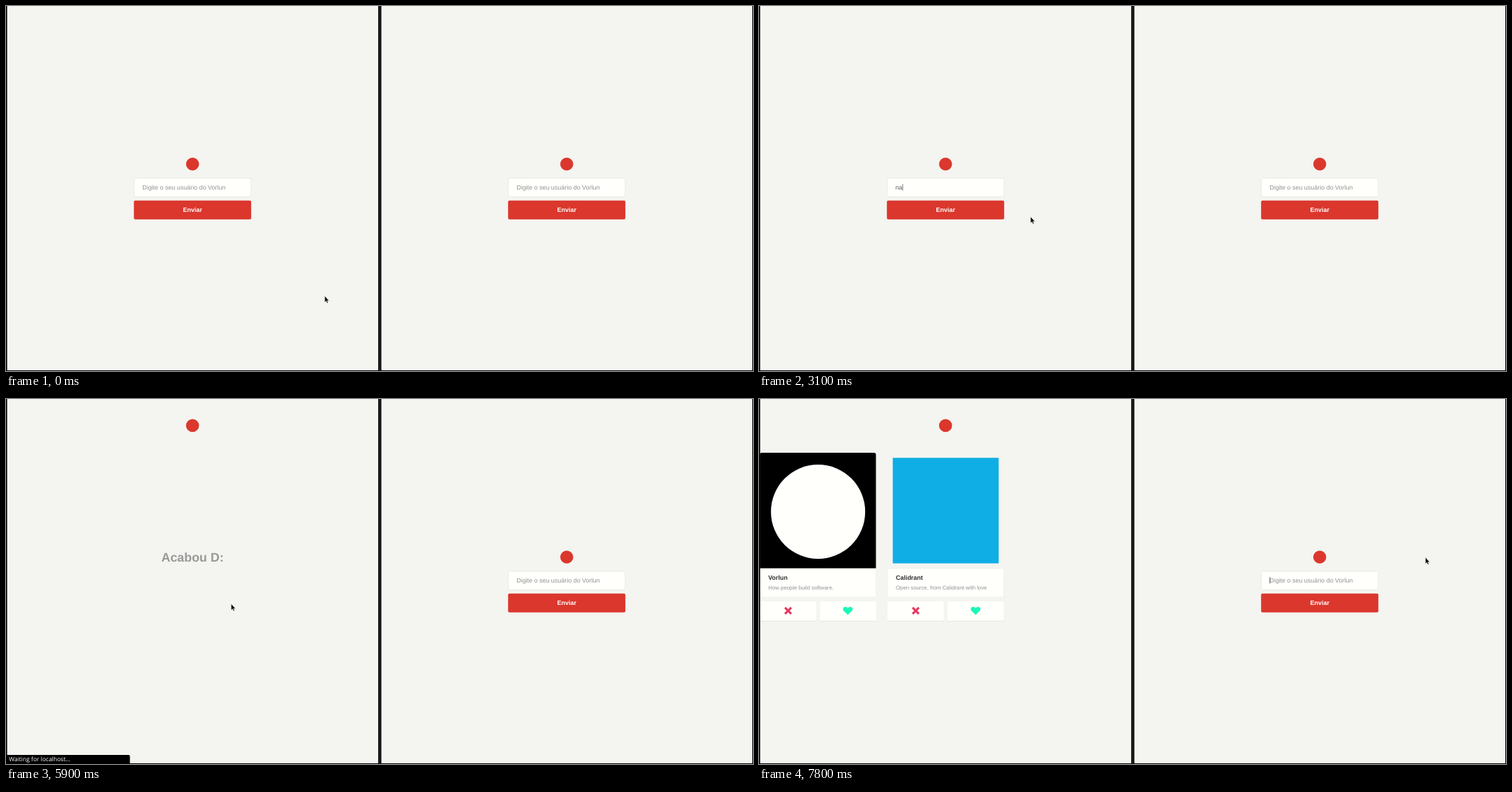
An HTML page for the animation above (8 s loop, 1070x523 px).

```html
<!DOCTYPE html>
<html lang="pt-BR">
<head>
<meta charset="utf-8">
<title>Login</title>
<style>
  html, body { margin: 0; width: 100%; height: 100%; overflow: hidden; background: #000; }
  svg { display: block; width: 1070px; height: 523px; }
  text { font: 8.95px "Liberation Sans", Arial, sans-serif; white-space: pre; text-rendering: geometricPrecision; }
  .bold { font-weight: bold; }
  .hint { fill: #929292; }
  .typed { fill: #606060; }
  .name { font-weight: bold; fill: #2e2e2e; }
  .bio { font-size: 7.81px; fill: #929292; }
  .over { font-size: 17.86px; font-weight: bold; fill: #999; }
  .status { font: 8.5px "Open Sans", "Noto Sans", sans-serif; fill: #fff; }
  .caret { stroke: #444; stroke-width: .7; }
  .box { fill: #fffffc; stroke: #e0e0dd; stroke-width: .6; }
  .red { fill: #db372d; }
  .page { fill: #f4f4f0; }
</style>
</head>
<body>
<svg viewBox="0 0 1070 523">
  <defs>
    <circle id="logo" class="red" r="9.3"/>
    <g id="form">
      <use href="#logo" x="267.2" y="226.5"/>
      <rect class="box" x="183.6" y="246.9" width="167.3" height="26.2" rx="2"/>
      <rect class="red" x="183.2" y="278.8" width="168" height="26.9" rx="2"/>
      <text class="bold" x="267.2" y="295.2" text-anchor="middle" fill="#fff">Enviar</text>
    </g>
    <text id="hint" class="hint" x="195.2" y="262.8">Digite o seu usuário do Vorlun</text>
    <path id="heart" fill="#19f8b6" d="M0 5.9L-6 .1C-8.8-3.3-4.4-7.7-1-4.6L0-3.6 1-4.6C4.4-7.7 8.8-3.3 6 .1Z"/>
    <path id="cross" d="M-4.5-4.5L4.5 4.5M4.5-4.5L-4.5 4.5" stroke="#e8385f" stroke-width="3.1"/>
    <g id="button">
      <rect x="0" y="290.8" width="80.7" height="28.2" rx="2" fill="#000" opacity=".06"/>
      <rect x="0" y="290" width="80.7" height="27.8" rx="2" fill="#fffffc"/>
    </g>
    <g id="card">
      <path d="M.3 243H166.3V282a2 2 0 0 1-2 2H2.3a2 2 0 0 1-2-2Z" fill="#fffffc" stroke="#ebebe8" stroke-width=".6"/>
      <use href="#button"/>
      <use href="#button" x="86"/>
      <use href="#cross" x="40.5" y="303.3"/>
    </g>
    <path id="arrow" d="M0 0V9L2 7.2 3.4 10.3 4.9 9.6 3.5 6.7H6.2Z" fill="#111" stroke="#fff" stroke-width=".4"/>
    <path id="beam" d="M-2.2-4.6Q0-4.6 0-3.6 0-4.6 2.2-4.6M0-3.8V3.8M-2.2 4.6Q0 4.6 0 3.6 0 4.6 2.2 4.6" fill="none" stroke="#444" stroke-width="1"/>
    <path id="hand" d="M.8 .9Q1.8-.2 2.7 1L4 3.5 7.2 4.2Q8.5 4.6 8.3 6L7.6 10.4H3.2L.3 7Q.3 5.7 2 6.1L2.4 6Z" fill="#222" stroke="#fff" stroke-width=".4"/>
  </defs>

  <rect width="1070" height="523"/>
  <rect x="535" width="1" height="523" fill="#333"/>
  <rect class="page" width="533.2" height="522"/>
  <rect class="page" x="537.6" width="531.4" height="522"/>

  <g id="login">
    <use href="#form"/>
    <use id="leftHint" href="#hint"/>
    <text id="typed" class="typed" x="195.2" y="262.8"></text>
    <path id="leftCaret" class="caret" d="M195.7 255V264.6"/>
  </g>

  <g id="main">
    <use href="#logo" x="267.2" y="38"/>
    <text id="over" class="over" x="267.2" y="232.6" text-anchor="middle">Acabou D:</text>
    <g id="cards">
      <g transform="translate(1.2)">
        <use href="#card"/>
        <path d="M0 242.5V80a3 3 0 0 1 3-3H163.3a3 3 0 0 1 3 3V242.5Z"/>
        <circle cx="83.4" cy="161.5" r="67.5" fill="#fffffc"/>
        <text class="name" x="12.1" y="259.3">Vorlun</text>
        <text class="bio" x="12.1" y="272.6">How people build software.</text>
        <use href="#heart" x="126" y="303.4"/>
      </g>
      <g transform="translate(184)">
        <use href="#card"/>
        <rect x="7.6" y="84.3" width="151.7" height="151.2" fill="#0faee4"/>
        <text class="name" x="12" y="259.3">Calidrant</text>
        <text class="bio" x="12" y="272.6">Open source, from Calidrant with love</text>
        <use id="liked" href="#heart" x="126.3" y="303.4"/>
      </g>
    </g>
    <g id="status">
      <path d="M0 523V510H175.5a2 2 0 0 1 2 2V523Z"/>
      <text class="status" x="4.3" y="518.7">Waiting for localhost…</text>
    </g>
  </g>

  <!-- window edge, over the cards that run past it -->
  <rect width="1.6" height="523"/>

  <use href="#form" x="536"/>
  <use href="#hint" x="536"/>
  <path id="rightCaret" class="caret" d="M731.7 255V264.6"/>
  <use id="cursor" href="#arrow"/>
</svg>

<script>
const LOOP = 8000;
const USER = "navio5293";
const $ = id => document.getElementById(id);

// Each track lists [start time, value...]; a value holds until the next entry.
const pointer = [
  [0, "arrow", 456.5, 415.5],
  [900, "arrow", 446, 395], [1000, "arrow", 422, 352],
  [1100, "arrow", 396, 309], [1200, "arrow", 383, 293],
  [1400, "arrow", 354, 276], [1500, "beam", 326.7, 266.7],
  [2000, "arrow", 360, 284], [2100, "arrow", 389, 302],
  [5200, "arrow", 378, 302], [5300, "hand", 344, 298], [5400, "hand", 321.5, 293.8],
  [5900, "arrow", 322.5, 293.5], [6000, "hand", 321, 293.8],
  [6500, "hand", 317.3, 289.6], [6600, "arrow", 319, 288.3],
  [6900, "arrow", 365, 330], [7000, "arrow", 500, 412], [7100, "arrow", 660, 430],
  [7200, "arrow", 810, 380], [7300, "arrow", 888, 300], [7400, "beam", 868, 259.6],
  [7800, "arrow", 954.6, 227]
];
const typing = [[0, 0], [3100, 2], [3200, 3], [3300, 4], [3800, 6], [3900, 7], [4100, 8], [4200, 9]];
const caret = [[0, 0], [1800, 1], [2400, 0], [3100, 1], [5200, 0], [5400, 1], [5700, 0], [7700, 1]];
const lift = [[0, 0], [6000, -1.6], [6100, -2.8], [6600, 0]];

const at = (track, t) => track.findLast(step => step[0] <= t).slice(1);
const show = (id, on) => $(id).setAttribute("visibility", on ? "inherit" : "hidden");
const move = (id, x, y) => $(id).setAttribute("transform", `translate(${x} ${y})`);

function draw(t) {
  const [shape, x, y] = at(pointer, t);
  $("cursor").setAttribute("href", "#" + shape);
  move("cursor", x, y);

  const entered = t >= 5900;
  const [count] = at(typing, t);
  const [blink] = at(caret, t);
  show("login", !entered);
  show("leftHint", !count && !entered);
  $("typed").textContent = USER.slice(0, count);
  move("leftCaret", count ? $("typed").getComputedTextLength() + .2 : 0, 0);
  show("leftCaret", blink && !entered);
  show("rightCaret", blink && entered);

  show("main", entered);
  show("over", entered && t < 6000);
  show("cards", t >= 6000);
  show("status", entered && t < 6200);
  move("liked", 0, at(lift, t)[0]);
}

const start = performance.now();
function tick() {
  draw((performance.now() - start) % LOOP);
  requestAnimationFrame(tick);
}
tick();
</script>
</body>
</html>
```
